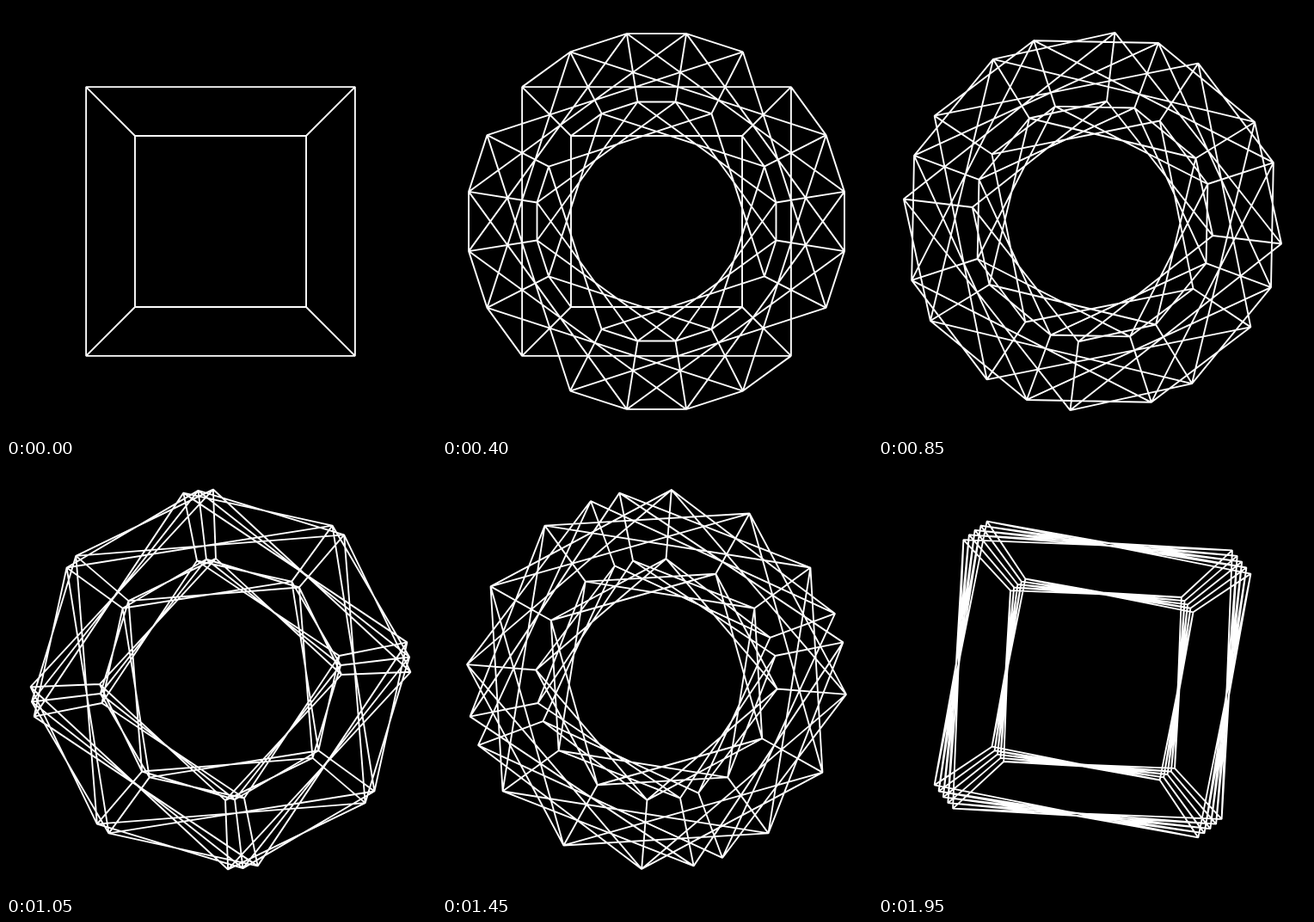
These frames come from a looping animation (500x500 px, 2 s). An HTML page:

```html
<!DOCTYPE html>
<html lang="en">
<head>
<meta charset="utf-8">
<title>Turning cubes</title>
<style>
  html, body { margin: 0; width: 100%; height: 100%; overflow: hidden; background: #000; }
  svg { display: block; width: 100%; height: 100%; }
  path { fill: none; stroke: #fff; stroke-width: 1.9; stroke-linejoin: bevel; }
</style>
</head>
<body>
<svg viewBox="0 0 500 500"><path id="cubes"/></svg>
<script>
  const LOOP = 2000, STEP = 50, CUBES = 5;
  const CENTER = { x: 249.5, y: 250.5 };
  const FOCAL = 547.3, DISTANCE = 4.5; // cube half-size is 1
  const path = document.getElementById('cubes');

  // Four projected corners of the face at depth z, turned counterclockwise.
  function face(z, turn) {
    const radius = Math.SQRT2 * FOCAL / (DISTANCE - z);
    return [0, 1, 2, 3].map(i => {
      const a = turn + (i + 0.5) * Math.PI / 2;
      const x = CENTER.x + radius * Math.cos(a);
      const y = CENTER.y - radius * Math.sin(a);
      return x.toFixed(2) + ' ' + y.toFixed(2);
    });
  }

  const polyline = points => 'M' + points.join('L');

  // Cube k makes k quarter turns per loop; matching corners of
  // neighbouring cubes are joined by chains.
  function draw(time) {
    const progress = Math.floor(time % LOOP / STEP) * STEP / LOOP;
    const cubes = Array.from({ length: CUBES }, (_, k) => {
      const turn = (k + 1) * progress * Math.PI / 2;
      return { near: face(1, turn), far: face(-1, turn) };
    });

    let d = '';
    for (const { near, far } of cubes) d += polyline(near) + 'Z' + polyline(far) + 'Z';
    for (let i = 0; i < 4; i++) {
      for (const { near, far } of cubes) d += polyline([near[i], far[i]]);
      d += polyline(cubes.map(c => c.near[i])) + polyline(cubes.map(c => c.far[i]));
    }
    path.setAttribute('d', d);
  }

  const start = performance.now();
  function tick() {
    draw(performance.now() - start);
    requestAnimationFrame(tick);
  }
  tick();
</script>
</body>
</html>
```
